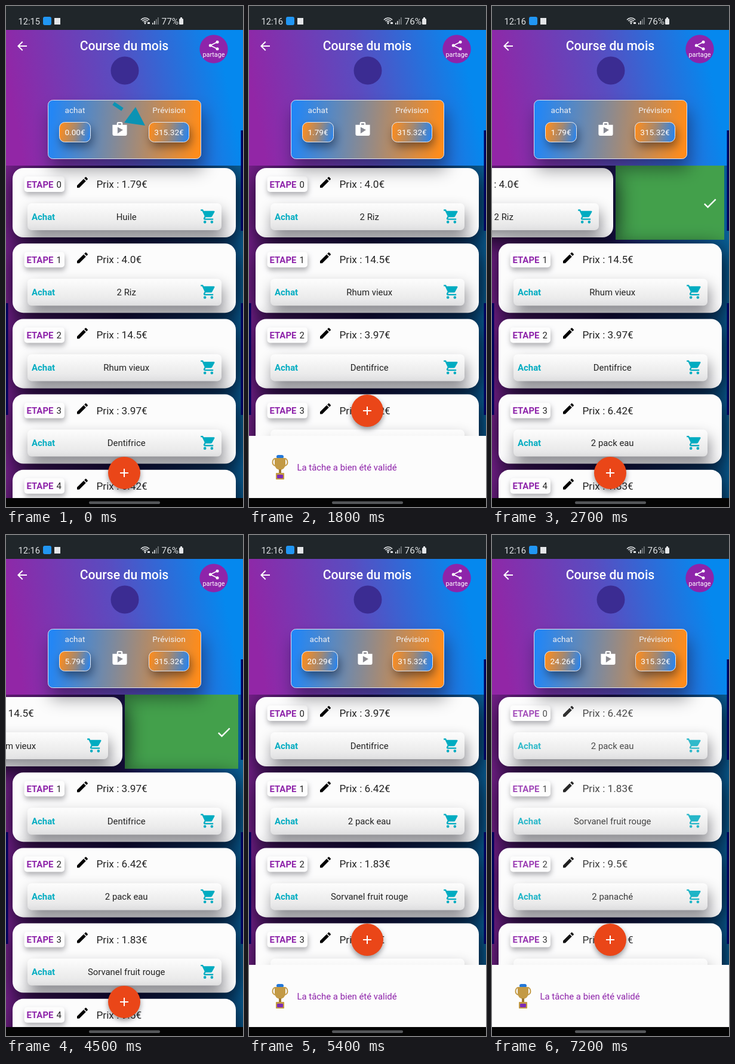
Recreate the animation shown at these times as an HTML page with a canvas. Size 397 by 838 pixels, loop 8000 ms.

```html
<!DOCTYPE html>
<html lang="fr">
<head>
<meta charset="utf-8">
<title>Course du mois</title>
<style>
html, body { margin: 0; width: 100%; height: 100%; overflow: hidden; background: #000; }
canvas { display: block; }
</style>
</head>
<body>
<canvas id="stage" width="397" height="838"></canvas>
<script>
const ctx = document.getElementById('stage').getContext('2d');
const LOOP = 8000, STEP = 900, PITCH = 126.2, LIST_TOP = 267, NAV_TOP = 823;
const PURPLE = '#8e24aa', TEAL = '#00acc1';

const ITEMS = [
  ['Huile', '1.79'], ['2 Riz', '4.0'], ['Rhum vieux', '14.5'], ['Dentifrice', '3.97'],
  ['2 pack eau', '6.42'], ['Sorvanel fruit rouge', '1.83'], ['2 panaché', '9.5'], ['Biscuits', '1.61'],
];

// One entry per step: first = first remaining item, swipe = offset of the top card.
const SCENES = [
  { first: 0, arrow: true },
  { first: 0, swipe: -182 },
  { first: 1, snack: true },
  { first: 1, swipe: -182 },
  { first: 2, snack: true },
  { first: 2, swipe: -190 },
  { first: 3, snack: true },
  { first: 3, swipe: -174 },
  { first: 4, snack: true, fade: true },
];

const ICONS = {
  back: 'M20 11H7.83l5.59-5.59L12 4l-8 8 8 8 1.41-1.41L7.83 13H20z',
  edit: 'M3 17.25V21h3.75L17.81 9.94l-3.75-3.75zM20.71 7.04c.39-.39.39-1.02 0-1.41l-2.34-2.34c-.39-.39-1.02-.39-1.41 0l-1.83 1.83 3.75 3.75z',
  cart: 'M7 18a2 2 0 1 0 0 4 2 2 0 0 0 0-4zM1 2v2h2l3.6 7.59-1.35 2.45A2 2 0 0 0 7 17h12v-2H7.42a.25.25 0 0 1-.22-.37L8.1 13h7.45c.75 0 1.41-.41 1.75-1.03l3.58-6.49A1 1 0 0 0 20 4H5.21l-.94-2zM17 18a2 2 0 1 0 0 4 2 2 0 0 0 0-4z',
  shop: 'M16 6V4a2 2 0 0 0-2-2h-4a2 2 0 0 0-2 2v2H2v13a2 2 0 0 0 2 2h16a2 2 0 0 0 2-2V6zM10 4h4v2h-4zM9 18V9l7.5 4z',
  check: 'M9 16.17L4.83 12l-1.42 1.41L9 19 21 7l-1.41-1.41z',
};
for (const name in ICONS) ICONS[name] = new Path2D(ICONS[name]);

function icon(name, cx, cy, size, color) {
  ctx.save();
  ctx.translate(cx - size / 2, cy - size / 2);
  ctx.scale(size / 24, size / 24);
  ctx.fillStyle = color;
  ctx.fill(ICONS[name], 'evenodd');
  ctx.restore();
}

function text(str, x, y, size, color, { weight = 400, align = 'left' } = {}) {
  ctx.font = `${weight} ${size}px Roboto, sans-serif`;
  ctx.textAlign = align;
  ctx.fillStyle = color;
  ctx.fillText(str, x, y);
}

function gradient(x0, y0, x1, y1, ...colors) {
  const g = ctx.createLinearGradient(x0, y0, x1, y1);
  colors.forEach((c, i) => g.addColorStop(i / (colors.length - 1), c));
  return g;
}

function rect(x, y, w, h, color) {
  ctx.fillStyle = color;
  ctx.fillRect(x, y, w, h);
}

// shadow: [dx, dy, blur, alpha]
function box(x, y, w, h, r, fill, shadow, border) {
  ctx.save();
  ctx.beginPath();
  ctx.roundRect(x, y, w, h, r);
  if (shadow) {
    [ctx.shadowOffsetX, ctx.shadowOffsetY, ctx.shadowBlur] = shadow;
    ctx.shadowColor = `rgba(0,0,10,${shadow[3]})`;
  }
  ctx.fillStyle = fill;
  ctx.fill();
  ctx.shadowColor = 'transparent';
  if (border) {
    ctx.strokeStyle = border;
    ctx.stroke();
  }
  ctx.restore();
}

function disc(x, y, r, fill, shadow) {
  box(x - r, y - r, 2 * r, 2 * r, r, fill, shadow);
}

function line(color, width, ...points) {
  ctx.strokeStyle = color;
  ctx.lineWidth = width;
  ctx.beginPath();
  points.forEach(([x, y]) => ctx.lineTo(x, y));
  ctx.stroke();
  ctx.lineWidth = 1;
}

function polygon(color, ...points) {
  ctx.fillStyle = color;
  ctx.beginPath();
  points.forEach(([x, y]) => ctx.lineTo(x, y));
  ctx.fill();
}

function statusBar(early) {
  rect(0, 0, 397, 40, '#20262a');
  text(early ? '12:15' : '12:16', 20.5, 30.5, 14.7, '#dfe2e4');
  box(62, 18, 14, 14, 3, '#2196f3');
  rect(81, 20, 10, 11, '#e4e6e8');
  ctx.strokeStyle = '#dfe2e4';
  ctx.lineWidth = 1.6;
  for (const r of [3, 6, 9]) {
    ctx.beginPath();
    ctx.arc(233, 29, r, -Math.PI * 0.78, -Math.PI * 0.22);
    ctx.stroke();
  }
  ctx.lineWidth = 1;
  disc(233, 29, 1.4, '#dfe2e4');
  rect(237, 27, 4, 3, '#dfe2e4');
  for (let i = 0; i < 4; i++) rect(245 + i * 3, 28 - i * 3, 1.6, 3 + i * 3, i < 2 ? '#dfe2e4' : '#777c80');
  text(early ? '77%' : '76%', 260.5, 30.5, 15.4, '#dfe2e4');
  box(290, 21, 7, 10, 1.5, '#e4e6e8');
  rect(292, 19, 3, 2, '#e4e6e8');
}

function card(x, y, index, [name, price], alpha) {
  ctx.save();
  ctx.translate(x, y);
  box(11, 4, 374, 116, 18, '#fcfcfc', [3, 10, 36, 0.9]);
  ctx.beginPath();
  ctx.roundRect(11, 4, 374, 116, 18);
  ctx.clip();
  box(36, 63, 325, 45, 7, gradient(0, 63, 0, 108, '#fdfdfd', '#e4e4e4'), [3, 13, 24, 0.45]);
  box(30.5, 18, 67.5, 26, 5, '#fdfdfd', [1, 5, 9, 0.3]);
  ctx.globalAlpha = alpha;
  text('ETAPE', 34.5, 36.5, 14.9, PURPLE, { weight: 700 });
  text(index, 84.5, 36.5, 14.9, '#222');
  icon('edit', 128, 28, 24, '#000');
  text(`Prix : ${price}€`, 151.5, 37, 17.2, '#222');
  text('Achat', 43, 90.5, 14.9, TEAL, { weight: 700 });
  text(name, 201.7, 90.5, 14.9, '#222', { align: 'center' });
  icon('cart', 339, 85, 28, TEAL);
  ctx.restore();
}

function list({ first, swipe = 0, fade }) {
  ctx.save();
  ctx.beginPath();
  ctx.rect(0, LIST_TOP, 397, NAV_TOP - LIST_TOP);
  ctx.clip();
  rect(0, LIST_TOP, 397, 560, gradient(0, 0, 397, 0, '#741f88', '#1d1450', '#086096'));
  if (swipe) rect(389 + swipe, LIST_TOP, -swipe, 124, '#43a04b');
  for (let i = 0; i < 5; i++) {
    card(i ? 0 : swipe, LIST_TOP + i * PITCH, i, ITEMS[first + i] || ITEMS[7], fade ? 0.8 + i * 0.04 : 1);
  }
  if (swipe) icon('check', 365, LIST_TOP + 63, 28, '#fff');
  ctx.restore();
}

function amount(x, w, label, value) {
  const middle = x + w / 2;
  text(label, middle, 179, 13.6, '#f1f1f4', { align: 'center' });
  box(x + 0.5, 194.5, w - 1, 33, 9, gradient(x, 205, x + w, 217, '#ff8d1c', '#a5886f', '#2484f2'),
    [3, 8, 16, 0.45], '#e8eaf0');
  text(value + '€', middle, 215.5, 13.6, '#fff', { align: 'center' });
}

function header() {
  rect(0, 40, 397, LIST_TOP - 40, gradient(15, 195, 370, 125, '#9226a6', '#5a4cc0', '#0588ee'));
  icon('back', 27, 67, 24, '#fff');
  text('Course du mois', 198, 74, 21.2, '#fff', { weight: 500, align: 'center' });
  disc(199, 108, 23.5, '#3b2c92');
  disc(348, 72, 23.7, PURPLE);
  const nodes = [[354, 60.3], [342.3, 66], [354, 71.7]];
  line('#fff', 1.8, ...nodes);
  for (const [x, y] of nodes) disc(x, y, 2.5, '#fff');
  text('partage', 348, 85, 10.8, '#fff', { align: 'center' });
}

function summary({ first, arrow }) {
  const spent = ITEMS.slice(0, first).reduce((sum, [, price]) => sum + +price, 0);
  const wide = spent >= 10;
  box(70.5, 157.5, 256, 98, 8, gradient(75, 195, 322, 220, '#2386f5', '#8f8a8c', '#ff8c1a'),
    [4, 18, 28, 0.4], '#dfe3ee');
  amount(wide ? 88 : 89, wide ? 61 : 53, 'achat', spent.toFixed(2));
  amount(wide ? 240 : 239, 68, 'Prévision', '315.32');
  icon('shop', wide ? 194.5 : 190.5, 206, 29, '#fff');
  if (arrow) {
    line('#0b93b4', 6, [180, 163], [195, 173]);
    polygon('#0b93b4', [217, 169], [198, 195], [233, 200]);
  }
}

function trophy() {
  const gold = '#c39a45';
  ctx.strokeStyle = gold;
  ctx.lineWidth = 2;
  for (const x of [44, 60]) {
    ctx.beginPath();
    ctx.ellipse(x, 763, 4.5, 6, 0, 0, 7);
    ctx.stroke();
  }
  ctx.lineWidth = 1;
  box(46, 751, 12, 6, 3, '#2478d8');
  box(43, 756, 18, 20, [1, 1, 9, 9], gold);
  rect(50, 775, 4, 7, '#9c7630');
  box(45, 781, 14, 11, 1, gold);
  box(47, 784, 10, 6, 1, '#7d2bb5');
}

function draw(step) {
  const scene = SCENES[step];
  header();
  list(scene);
  rect(393.5, 208, 3.5, 168, '#00005c');
  for (const x of [0, 393.5]) rect(x, 497, 3.5, 187, '#00005c');
  summary(scene);
  statusBar(step < 2);
  if (scene.snack) {
    rect(0, 719, 397, 104, '#fcfcfc');
    trophy();
    text('La tâche a bien été validé', 80.5, 776.5, 14.9, PURPLE);
  }
  const y = scene.snack ? 677 : 781;
  disc(198, y, 27, '#ea4618', [0, 4, 9, 0.4]);
  line('#fff', 2, [191, y], [205, y]);
  line('#fff', 2, [198, y - 7], [198, y + 7]);
  rect(0, NAV_TOP, 397, 15, '#050505');
  box(139, 828.5, 119, 4.5, 2, '#55575a');
}

function tick() {
  draw(Math.floor((performance.now() % LOOP) / STEP));
  requestAnimationFrame(tick);
}
tick();
</script>
</body>
</html>
```
